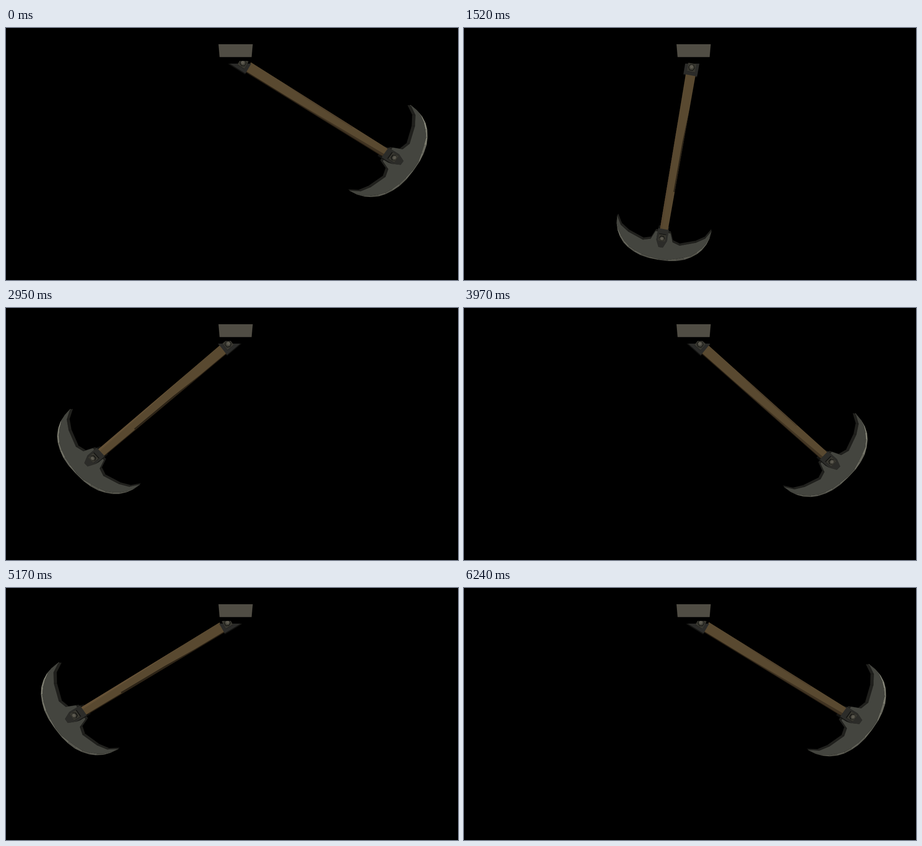
An HTML page with a canvas that plays this animation: 1002x559 px, repeating every 6290 ms.

```html
<!DOCTYPE html>
<html>
<head>
<meta charset="utf-8">
<title>Swinging axe</title>
<style>
  html, body { margin: 0; width: 100%; height: 100%; overflow: hidden; background: #000; }
  canvas { display: block; }
</style>
</head>
<body>
<canvas id="stage" width="1002" height="559"></canvas>
<script>
const ctx = document.getElementById('stage').getContext('2d');
const WIDTH = 1002, HEIGHT = 559;
const LOOP = 6290, STEP = 46.34, LAST_STEP = 135;

// Camera: focal length and downward pitch; the axe hangs from a pivot near the top.
const FOCAL = 571, PITCH_SIN = 0.18, PITCH_COS = 0.983;
const PIVOT_X = 7, PIVOT_Y = -211.2;

// Axe space: u across the axe, v down the handle, z toward the viewer.
const TIP_V = 397, EDGE_FACETS = 18;
let sin = 0, cos = 1;

function project([u, v, z]) {
  const x = u * cos + v * sin, y = v * cos - u * sin;
  const depth = 1 + (PITCH_SIN * y - PITCH_COS * z) / FOCAL;
  return [WIDTH / 2 + (PIVOT_X + x) / depth,
          HEIGHT / 2 + (PIVOT_Y + PITCH_COS * y + PITCH_SIN * z) / depth];
}

function fill(points, color) {
  ctx.beginPath();
  for (const p of points) ctx.lineTo(...p);
  ctx.closePath();
  ctx.fillStyle = color;
  ctx.fill();
}

const face = (points, z, color) => fill(points.map(([u, v]) => project([u, v, z])), color);
const tint = (rgb, level) => `rgb(${rgb.map(c => Math.round(c * level))})`;
const mirror = points => points.map(([u, v]) => [-u, v]).reverse();
const box = (halfWidth, top, bottom) =>
  [[-halfWidth, top], [halfWidth, top], [halfWidth, bottom], [-halfWidth, bottom]];

// Joins two outlines, each at its own depth, with one quad per segment.
function strip(near, nearZ, far, farZ, colorOf) {
  for (let i = 1; i < near.length; i++) {
    const quad = [[...near[i - 1], nearZ], [...near[i], nearZ],
                  [...far[i], farZ], [...far[i - 1], farZ]];
    fill(quad.map(project), colorOf(near[i - 1], near[i], i));
  }
}

function walls(outline, front, back, color) {
  const closed = [...outline, outline[0]];
  strip(closed, front, closed, back, () => color);
}

function below(y, paint) {
  ctx.save();
  ctx.beginPath();
  ctx.rect(0, y, WIDTH, HEIGHT);
  ctx.clip();
  paint();
  ctx.restore();
}

function ring(v, radius, sides, turn = 0) {
  return Array.from({ length: sides }, (_, i) => {
    const a = turn + i * 2 * Math.PI / sides;
    return [radius * Math.cos(a), v + radius * Math.sin(a)];
  });
}

let seed = 7;
const random = () => (seed = seed * 16807 % 2147483647) / 2147483647;

// Lower half of a superellipse, from the left tip to the right tip.
function crescent(halfWidth, drop, power, roughness) {
  return Array.from({ length: EDGE_FACETS + 1 }, (_, i) => {
    const a = Math.PI * i / EDGE_FACETS, c = Math.cos(a), s = Math.max(0, Math.sin(a));
    return [-halfWidth * Math.sign(c) * Math.abs(c) ** (2 / power),
            TIP_V + drop * s ** (2 / power) + roughness * s * (random() - 0.5)];
  });
}

const EDGE = crescent(120, 104, 2.3, 1.5);
const BEVEL = crescent(119, 97, 2.12, 5);
const HOLLOW = [[119, TIP_V], [107, 420], [86, 435], [47, 450], [28, 444], [19, 421]];
const INNER = [...HOLLOW, ...mirror(HOLLOW)];
const HANDLE = [[-10.5, 34], [11.5, 34], [11, 414], [-9, 414]];
const LEFT_FACET = [[-10, 130], [-3.5, 414], [-9, 414]];
const RIGHT_FACET = [[11.3, 108], [11, 312], [8, 312], [8.5, 190]];
const TOP_SOCKET = box(15.5, -8, 36);
const LOW_SOCKET = [...box(13.5, 411, 442).slice(0, 3), [6, 461], [-5, 461], [-13.5, 442]];

function blade() {
  strip(INNER, 0, INNER, -11, () => '#20201d');
  strip(EDGE, -4, BEVEL, 0, (a, b, i) => {
    const du = b[0] - a[0], dv = b[1] - a[1];
    const facingDown = (dv * sin + du * cos) / Math.hypot(du, dv);
    return tint([1, 1, 0.9], 116 - 34 * facingDown + (i % 2 ? 5 : -5));
  });
  face([...BEVEL, ...INNER], 0, '#44453f');
}

function handle() {
  const wood = [86, 69, 46];
  walls(HANDLE, 0, -14, '#2b2114');
  face(HANDLE, 0, '#594930');
  face(LEFT_FACET, 0, tint(wood, 0.96 - 0.25 * sin));
  face(RIGHT_FACET, 0, tint(wood, 0.5 + 0.5 * Math.max(0, sin)));
}

function bolt(v) {
  const plate = ring(v, 12.5, 4, Math.PI / 4);
  walls(plate, 7, 3, '#151513');
  face(plate, 7, '#383730');
  face(ring(v, 7.5, 6), 8, '#181815');
  face(ring(v, 6, 6), 10, '#43423a');
  face(ring(v - 1, 3.6, 8), 12, '#5d5a50');
}

function swingAngle(time) {
  const step = Math.min(LAST_STEP, Math.floor(time / STEP + 0.5));
  const drift = 2.2 * Math.sin(2 * Math.PI * step / 110);
  const phase = (8.11 * step - 9.5 + drift) * Math.PI / 180;
  return Math.PI / 3 * Math.cos(phase);
}

function draw(time) {
  const angle = swingAngle(time);
  sin = Math.sin(angle);
  cos = Math.cos(angle);

  ctx.fillStyle = '#000';
  ctx.fillRect(0, 0, WIDTH, HEIGHT);
  fill([[471, 36], [547, 36], [544.5, 64.5], [473.5, 64.5]], '#504d44');

  blade();
  walls(LOW_SOCKET, 3, -14, '#141412');
  below(79, () => walls(TOP_SOCKET, 3, -14, '#141412'));
  handle();
  face(LOW_SOCKET, 3, '#2c2c29');
  bolt(433);
  below(79, () => face(TOP_SOCKET, 3, '#2b2b29'));
  below(73, () => bolt(20));
}

function tick() {
  draw(performance.now() % LOOP);
  requestAnimationFrame(tick);
}
tick();
</script>
</body>
</html>
```
